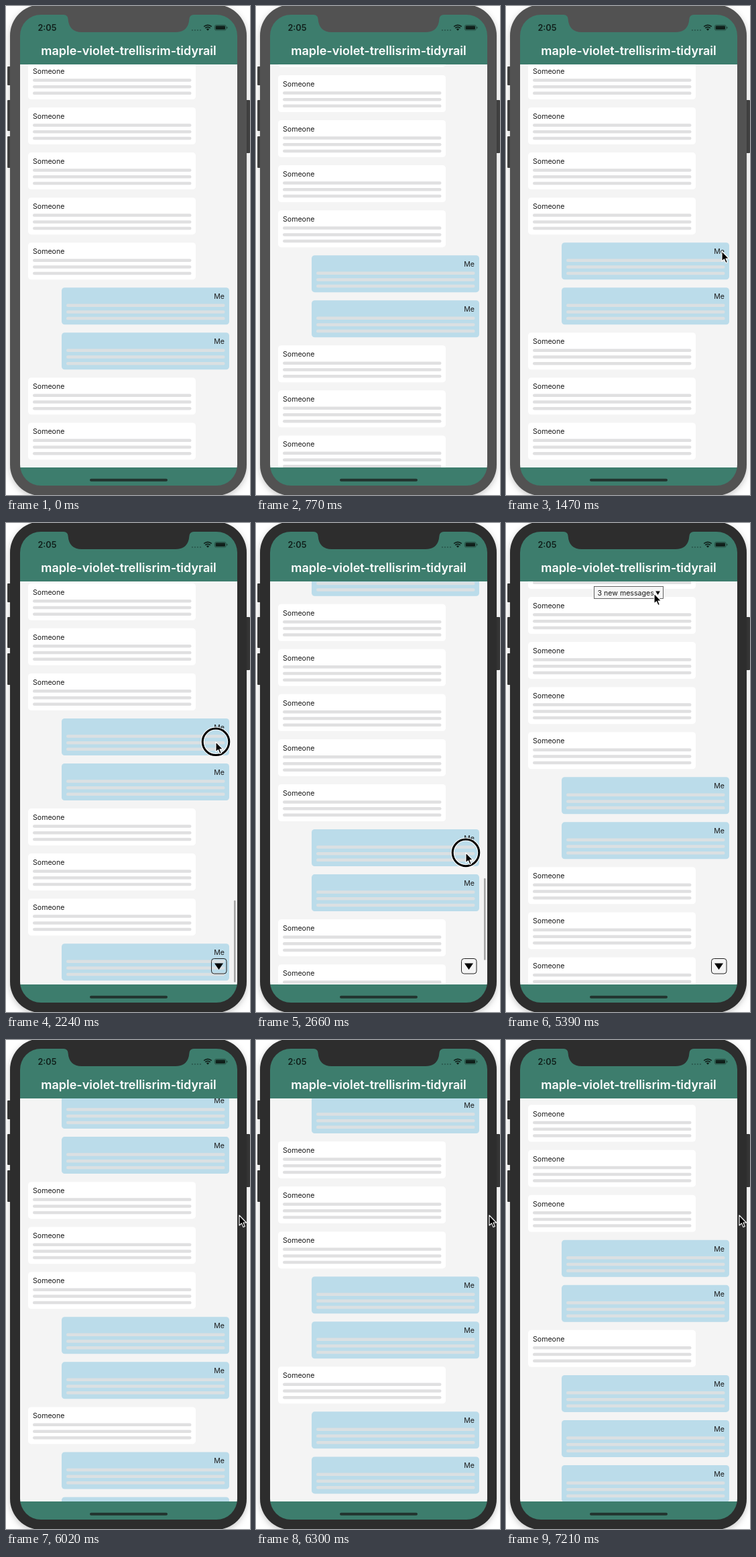
Write an HTML page that moves like this. It is 364 by 728 pixels and loops after 7280 ms.

```html
<!DOCTYPE html>
<html lang="en">
<head>
<meta charset="utf-8">
<title>Chat list</title>
<style>
  html, body { margin: 0; width: 100%; height: 100%; overflow: hidden; background: #fff; }
  svg { display: block; width: 100vw; height: 100vh; font-family: Inter, "Open Sans", sans-serif; }
  .bezel { fill: #525252; }
  .focused .bezel { fill: #2d2d2d; }
  .shadow { filter: drop-shadow(0 3px 5px rgba(0, 0, 0, .22)); }
  .side { fill: #444; }
  .focused .side { fill: #383838; }
  .green { fill: #3d7d6d; }
  .label { font-size: 10.6px; fill: #1b1b1b; }
  .status { fill: #10201b; }
</style>
</head>
<body>
<svg id="stage" viewBox="0 0 364 728">
  <defs>
    <clipPath id="screen"><rect x="21" y="13" width="324" height="701" rx="31"/></clipPath>
    <clipPath id="viewport"><rect x="21" y="87" width="324" height="600"/></clipPath>
  </defs>

  <g class="side">
    <rect x="2" y="90" width="6" height="28" rx="1"/>
    <rect x="2" y="140" width="6" height="46" rx="1"/>
    <rect x="2" y="194" width="6" height="47" rx="1"/>
    <rect x="357" y="140" width="7" height="79" rx="1"/>
  </g>
  <rect class="bezel shadow" x="6" y="-2" width="353" height="731" rx="46"/>

  <g clip-path="url(#screen)">
    <rect class="green" x="21" y="13" width="324" height="701"/>
    <rect x="21" y="87" width="324" height="600" fill="#f4f4f4"/>
    <g clip-path="url(#viewport)">
      <g id="list"></g>
      <rect id="bar" x="340" width="2.6" height="122" rx="1.3" fill="#a6a6a6"/>
      <g id="down">
        <rect x="306.5" y="648.5" width="22.5" height="22.5" rx="4" fill="none" stroke="#222"/>
        <path d="M311 655.5H324L317.5 665Z"/>
      </g>
      <g id="tag">
        <rect id="tagBox" y="94.5" height="18" fill="#f5f5f5" stroke="#555" stroke-width=".9"/>
        <text id="tagText" class="label" y="107.8"></text>
        <path id="tagArrow" d="M-3.3 101.5H3.3L0 107Z"/>
      </g>
    </g>
    <path class="bezel" d="M86 12V13Q92 13.500 92.500 19Q94 39 113 39H253Q272 39 273.500 19Q274 13.500 280 13V12Z"/>
    <g class="status">
      <text x="47.500" y="37" font-size="12.600" font-weight="600">2:05</text>
      <g opacity=".4">
        <circle cx="278" cy="36" r="1.100"/><circle cx="282" cy="36" r="1.100"/>
        <circle cx="286" cy="36" r="1.100"/><circle cx="290" cy="36" r="1.100"/>
      </g>
      <path d="M301 36.800L298.800 34.400Q301 32.600 303.200 34.400Z"/>
      <g fill="none" stroke="#10201b" stroke-width="1.600">
        <path d="M297.200 32.900Q301 29.800 304.800 32.900M295.200 30.700Q301 25.900 306.800 30.700"/>
        <rect x="311.400" y="28.400" width="16.800" height="7.800" rx="2.200" stroke-width=".8" opacity=".6"/>
      </g>
      <rect x="312.600" y="29.600" width="14.400" height="5.400" rx="1.200"/>
      <rect x="329" y="30.800" width="1.400" height="3" rx=".7" opacity=".6"/>
    </g>
    <text x="183" y="73.200" text-anchor="middle" font-size="18" font-weight="600" fill="#fff">maple-violet-trellisrim-tidyrail</text>
    <rect x="125" y="703.800" width="116" height="4" rx="2" fill="#22332e"/>
  </g>

  <g id="pointer">
    <g id="ring" fill="none">
      <circle r="19.800" stroke="#fff" stroke-width="5"/>
      <circle r="19.800" stroke="#000" stroke-width="3"/>
    </g>
    <path d="M0 0V15L3.500 11.900L6 17.600L8.400 16.600L6 11H10.700Z" stroke="#fff" stroke-width="1.100" stroke-linejoin="round"/>
  </g>
</svg>

<script>
  const LOOP = 7280, STEP = 70, PITCH = 67.05, FIRST = -3;
  const SENDERS = 'SMMSSSSSMMSSSMMSMMM';
  const $ = id => document.getElementById(id);
  const show = (id, on) => { $(id).style.display = on ? '' : 'none'; };

  const card = (sender, i) => {
    const mine = sender === 'M', x = mine ? 83 : 33;
    const lines = [24.2, 34, 43.6].map(y =>
      `<rect x="${x + 7}" y="${y}" width="236.500" height="4.500" rx="2.200" fill="${mine ? '#dbe0e2' : '#e0e0e1'}"/>`).join('');
    const name = mine
      ? '<text class="label" x="326" y="17" text-anchor="end">Me</text>'
      : '<text class="label" x="40" y="17">Someone</text>';
    return `<g transform="translate(0 ${84 + PITCH * (i + FIRST)})">
      <rect x="${x}" width="250" height="55" rx="4.500" fill="${mine ? '#bbdcea' : '#fff'}"/>${name}${lines}</g>`;
  };
  $('list').innerHTML = [...SENDERS].map(card).join('');

  const span = (t, from, to) => Math.min(1, Math.max(0, (t - from) / (to - from)));
  const ease = u => (1 - Math.cos(Math.PI * u)) / 2;
  const smooth = u => u * u * (3 - 2 * u);

  // Animated scrolls: start time and distance in pixels.
  const SCROLLS = [[545, PITCH], [1628, PITCH], [5234, 302 + 3 * PITCH], [5947, PITCH], [6960, PITCH]];
  const dragged = t => 302 * smooth(span(t, 2165, 3075));
  const scrollTop = t => SCROLLS.reduce(
    (sum, [start, distance]) => sum + distance * ease(span(t, start, start + 350)), -dragged(t));

  // Pointer moves: start, end, destination.
  const MOVES = [
    [1030, 1470, 322, 365], [1610, 2165, 313, 320], [2165, 3075, 313, 622],
    [3100, 3620, 221, 105], [5420, 5810, 348, 261]
  ];
  const pointerAt = t => {
    let x = 368, y = 330;
    for (const [from, to, nextX, nextY] of MOVES) {
      const k = smooth(span(t, from, to));
      x += (nextX - x) * k;
      y += (nextY - y) * k;
    }
    return [x, y];
  };

  function render(t) {
    $('stage').classList.toggle('focused', t >= 1610);
    $('list').setAttribute('transform', `translate(0 ${-scrollTop(t)})`);

    const unread = (t >= 2711) + (t >= 3794) + (t >= 4877);
    const gap = dragged(t) + (unread ? PITCH : 0);
    $('bar').setAttribute('y', 563 - gap * .2);
    $('bar').style.opacity = t < 2165 ? 0 : 1 - span(t, 3920, 4200);

    const away = t >= 2165 && t < 5570;
    show('down', away);
    show('tag', away && unread);
    const left = unread > 1 ? 131.5 : 134.5, right = unread > 1 ? 234.5 : 231;
    $('tagBox').setAttribute('x', left);
    $('tagBox').setAttribute('width', right - left);
    $('tagText').setAttribute('x', left + 5);
    $('tagText').textContent = `${unread} new message${unread > 1 ? 's' : ''}`;
    $('tagArrow').setAttribute('transform', `translate(${right - 8} 0)`);

    show('pointer', t >= 1050);
    show('ring', t >= 2100 && t < 3080);
    $('pointer').setAttribute('transform', `translate(${pointerAt(t).join(' ')})`);
  }

  const begin = performance.now();
  function tick() {
    const t = (performance.now() - begin) % LOOP;
    render(Math.floor(t / STEP) * STEP);
    requestAnimationFrame(tick);
  }
  tick();
</script>
</body>
</html>
```
